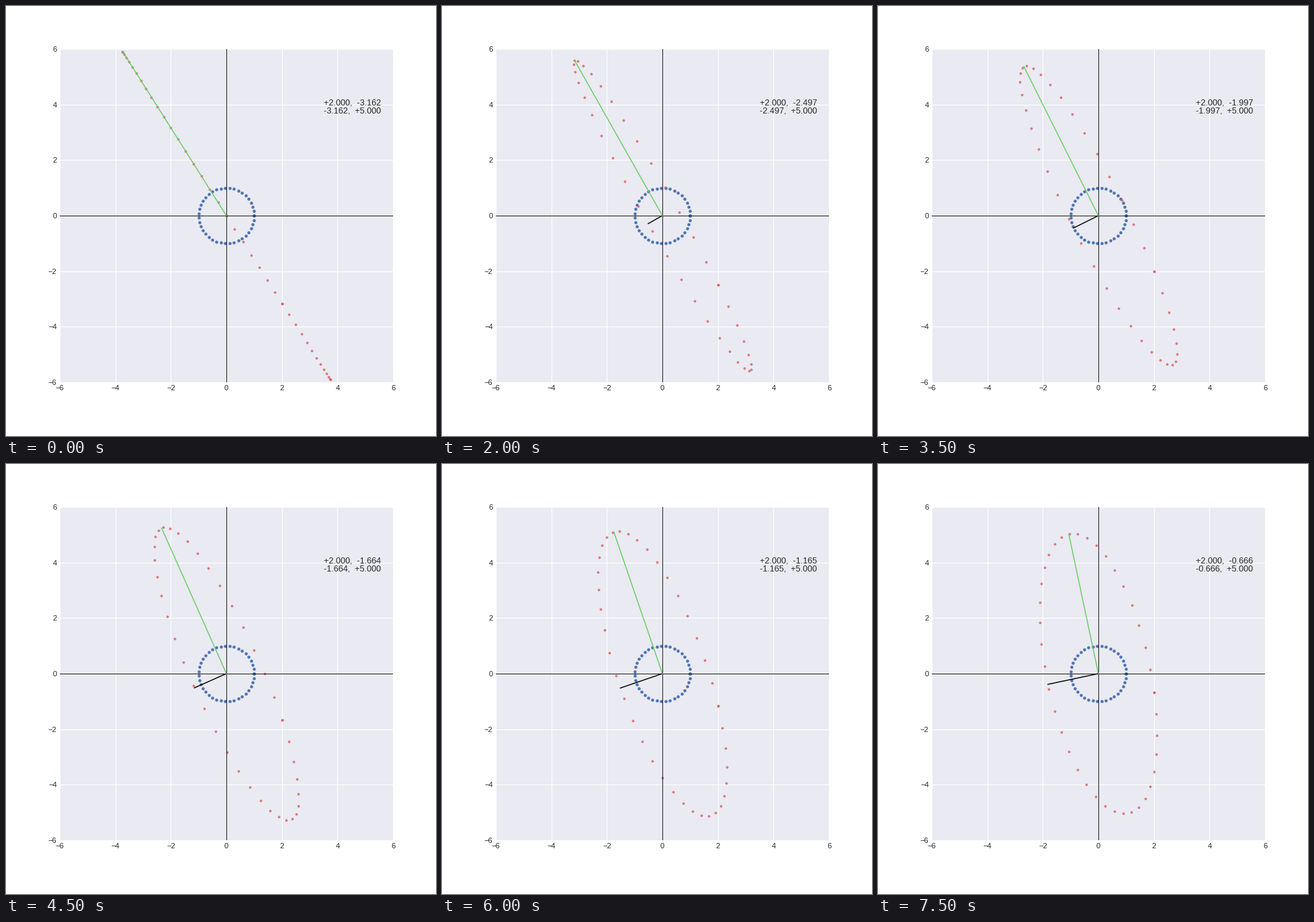
Write a matplotlib script that moves like this. It is 640 px wide and 640 px high and loops after 8 s.

```python
import numpy as np
import matplotlib.pyplot as plt
from matplotlib.animation import FuncAnimation

FRAMES, INTERVAL = 16, 500
A, D = 2.0, 5.0
STEPS = np.linspace(-np.sqrt(A * D), np.sqrt(A * D), 39)

plt.rcParams["font.family"] = "Liberation Sans"

angle = np.linspace(0, 2 * np.pi, 40)
circle = np.array([np.cos(angle), np.sin(angle)])

fig = plt.figure(figsize=(8, 8), dpi=80, facecolor="white")
ax = fig.add_axes([0.125, 0.125, 0.775, 0.775], facecolor="#EAEAF2")
ax.set(xlim=(-6, 6), ylim=(-6, 6))
ax.set_axisbelow(True)
ax.grid(color="white", lw=1)
ax.tick_params(length=0, pad=4, labelsize=10, labelcolor="#262626")
for spine in ax.spines.values():
    spine.set_visible(False)

ax.axhline(0, color="black", lw=0.8)
ax.axvline(0, color="black", lw=0.8)
ax.scatter(*circle, s=14, color="#4C72B0", lw=0.3, zorder=1.5)
dots = ax.scatter(*circle, s=12, color="#D65F5F", alpha=0.8, lw=0, zorder=1.6)
minor, = ax.plot([], [], color="black", lw=1.3)
major, = ax.plot([], [], color="#6ACC65", lw=1.3)
label = ax.text(3.5, 3.68, "", size=11.4, color="#262626", linespacing=1.0)


def eigen_arrows(b):
    """Both eigenvectors, scaled by their eigenvalues."""
    mid, gap = (A + D) / 2, np.hypot((D - A) / 2, b)
    low, high = mid - gap, mid + gap
    v = np.array([b, high - A])
    v /= np.hypot(*v)
    return low * np.array([-v[1], v[0]]), high * v


def update(i):
    b = STEPS[i]
    matrix = np.array([[A, b], [b, D]])
    dots.set_offsets((matrix @ circle).T)
    for line, (x, y) in zip((minor, major), eigen_arrows(b)):
        line.set_data([0, x], [0, y])
    label.set_text(f"{A:+.3f},  {b:+.3f}\n{b:+.3f},  {D:+.3f}")
    return dots, minor, major, label


anim = FuncAnimation(fig, update, frames=FRAMES, interval=INTERVAL,
                     init_func=lambda: update(0), repeat=True, repeat_delay=0)
plt.show()
```
